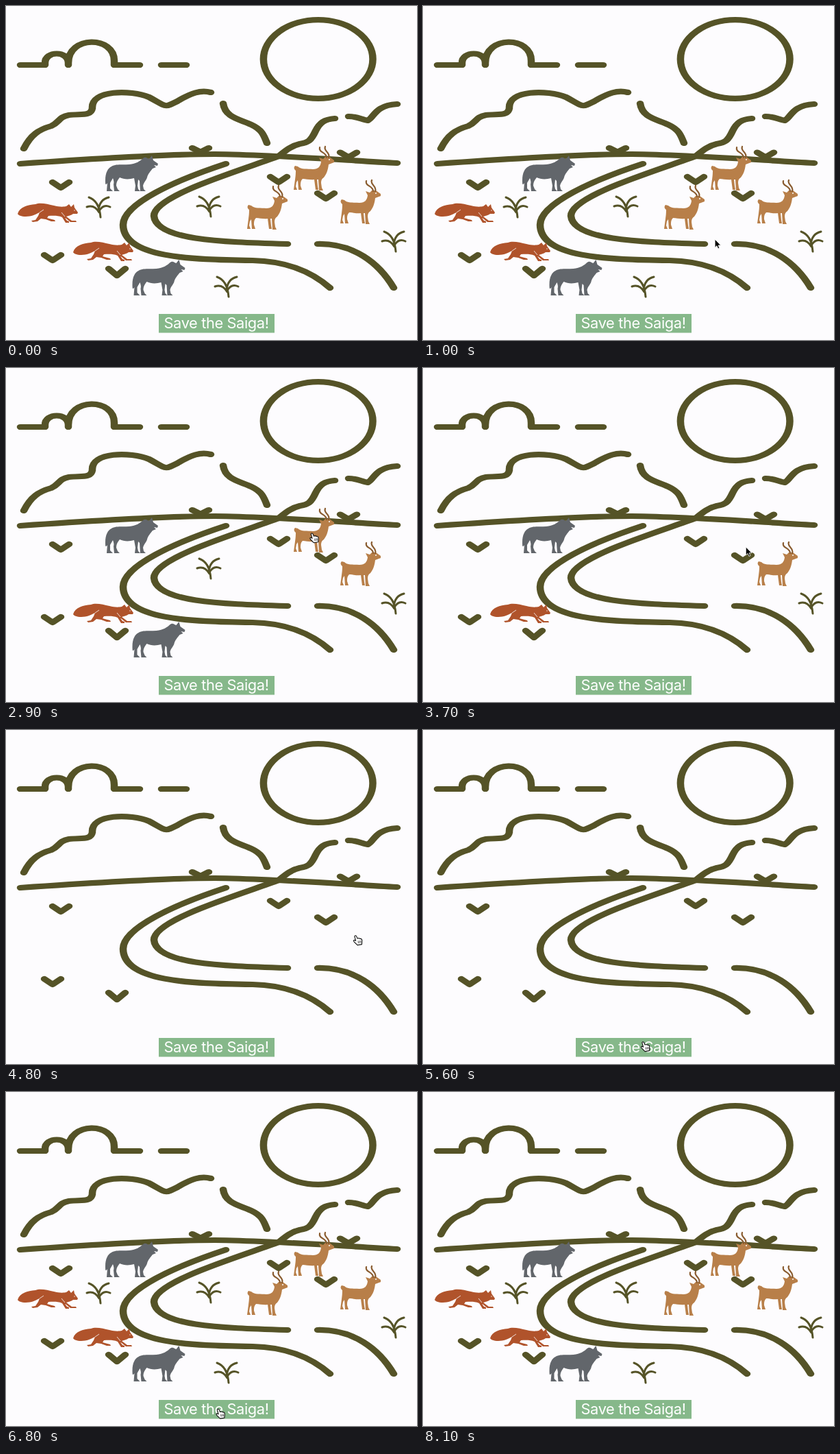
Recreate the animation shown at these times as an HTML page. Size 600 by 487 pixels, loop 8.3 s.

```html
<!DOCTYPE html>
<html lang="en">
<head>
<meta charset="utf-8">
<title>Save the Saiga!</title>
<style>
  html, body { margin: 0; width: 100%; height: 100%; overflow: hidden; background: #fdfcfe; }
  svg { display: block; width: 600px; height: 487px; }
  #land { fill: none; stroke: #555327; stroke-width: 8.2; stroke-linecap: round; stroke-linejoin: round; }
  #bush { fill: none; stroke: #555327; stroke-width: 3; stroke-linecap: round; }
  #wolf { fill: #62666b; }
  #fox { fill: #b0532b; }
  #saiga { fill: #b87f49; }
  text { font: 21.8px Inter, "Liberation Sans", sans-serif; letter-spacing: -.38px; fill: #fff; }
</style>
</head>
<body>
<svg viewBox="0 0 600 487">
  <defs>
    <path id="bush" d="M3,16C2,4-2,-9-14,-13M0,6C1,-4 6,-11 15,-13M-17,1Q-6,-3 1,9M1,7Q7,-4 17,1"/>
    <path id="wolf" d="M209,223L213,218L215,225L222,230L221,233L216,232L219,235L214,237C211,241 207,245 206,250
      C205,254 201,257 200,262L201,267L204,270H196L195,255L193,253L192,262L193,267L196,270H188L189,262L187,251
      C180,253 172,253 166,250C162,255 161,258 161,262L163,267L166,270H158L157,260C158,256 157,254 156,251
      L152,258V266L156,270H147L148,258C145,263 145,258 145,254C145,243 149,236 154,234
      C160,230 170,232 180,231C190,230 196,226 200,222C204,219 206,222 209,223Z"/>
    <g id="fox">
      <path d="M17,303C20,293 31,290 43,289C50,286 61,289 70,291C77,293 84,293 88,292L92,289L95,293L99,289L100,294
        L105,301L104,303L98,303C94,306 90,306 88,307L92,310L96,313L102,313L103,315H94L88,310L86,309
        L89,313L92,314V316H87L82,308C75,305 68,306 62,306L60,309C63,310 67,311 71,312L72,314H66L58,311
        L51,310L46,314L39,315L37,313L43,312L47,306L49,301C43,304 37,307 29,307C22,307 18,305 17,303Z"/>
      <path d="M49,301L55,297M86,307L81,301" fill="none" stroke="#fdfcfe" stroke-width=".8"/>
      <circle cx="100" cy="298" r=".7" fill="#fdfcfe"/>
    </g>
    <g id="saiga">
      <path d="M354,290L358,291C363,296 372,294 380,295C388,295 391,291 392,284L389,278L395,280L398,277L404,277
        L411,282V285L403,288C402,296 400,302 396,307C393,309 392,311 392,315L393,322L395,326H389L388,310H386
        L387,320L388,325H384L382,310C376,311 370,309 365,309C362,312 362,315 362,319L364,325H359L358,311
        L356,314L355,320L357,325H352L354,310C355,304 355,299 355,297C352,295 352,292 354,290Z"/>
      <path d="M400,278C400,270 388,271 390,263M403,278C406,270 395,269 398,262" fill="none"
        stroke="#8a5c30" stroke-width="2.2" stroke-linecap="round"/>
      <circle cx="404" cy="281" r="1" fill="#fdfcfe"/>
    </g>
  </defs>

  <g id="land" transform="scale(1.28 1)"></g>
  <g id="life"></g>
  <rect x="223" y="449" width="169" height="27.5" fill="#86b88a"/>
  <text x="230.5" y="470">Save the Saiga!</text>

  <g id="cursor" stroke-linejoin="round">
    <path id="arrow" d="M0,0V12L2.8,9.5L4.6,13.6L6.6,12.8L4.9,8.8H8.6Z" fill="#000" stroke="#fff" stroke-width=".8"/>
    <g id="hand" fill="#fff" stroke="#111" stroke-width="1.1">
      <path d="M1.8,1.8Q3,-.2 4.6,1.6L6,5Q8.4,3.8 9.2,5.2Q12.6,4.8 12.8,8L12.4,13.6L6,14.6L1.2,9.8Q-.4,7.4 1.8,7.2L3.6,8.2Z"/>
      <path d="M7,8.5L7.6,12M9,8.2L9.4,11.7M10.9,8L11,11.4" stroke-width=".7"/>
    </g>
  </g>
</svg>
<script>
const LOOP = 8300, STEP = 100, RESTORE = 6800, PEN = 1.28;
const $ = id => document.getElementById(id);

function add(parent, tag, attrs) {
  const el = document.createElementNS("http://www.w3.org/2000/svg", tag);
  for (const k in attrs) el.setAttribute(k, attrs[k]);
  return parent.appendChild(el);
}

// Landscape lines use a pen that is wider than it is tall.
const lines = [
  "M21,86L57,86L57,83C57,65 91,65 91,83L91,86L91,83C91,43 158,43 158,80L158,86L195,86",
  "M227,86L263,86",
  "M26,208C36,188 48,180 66,175C79,169 76,162 92,159C110,157 124,161 126,149C124,122 182,122 209,133C235,147 230,149 250,139C270,127 284,122 299,126",
  "M317,142C320,163 341,165 358,173C373,180 376,187 381,200",
  "M480,164C465,165 458,170 452,182C445,197 441,199 429,201C416,204 408,211 398,219C338,241 216,277 216,306C219,341 310,344 411,347",
  "M500,161C513,161 520,166 528,167C538,162 538,145 571,143",
  "M21,230C180,219 260,216 305,216C390,217 480,224 571,229",
  "M321,230C248,254 171,288 171,319C171,367 270,370 360,371C411,372 448,389 473,411",
  "M455,347C507,346 544,374 566,411"
];
const tufts = [[80, 261], [68, 367], [398, 253], [467, 277], [162, 388, 2], [284, 210, -2], [500, 217, -1]];
for (const [x, y, dip = 0] of tufts)
  lines.push(`M${x - 12},${y - 4 - dip / 2}L${x},${y + 4 + dip / 2}L${x + 12},${y - 4 - dip / 2}`);

for (const d of lines)
  add($("land"), "path", { d: d.replace(/([\d.]+),/g, (_, x) => (x / PEN).toFixed(2) + ",") });
add($("land"), "ellipse", { cx: 455.7 / PEN, cy: 77.5, rx: 79.8 / PEN, ry: 57.3 });

// Kind, offset, and the time of the click that removes it.
const life = [
  ["bush", 135, 292, 2100], ["fox", 0, 0, 2100], ["saiga", 0, 0, 2100], ["bush", 322, 408, 2100],
  ["bush", 296, 291, 3400], ["wolf", 39.5, 152, 3400], ["saiga", 68, -57, 3400],
  ["wolf", 0, 0, 4800], ["fox", 81, 56, 4800], ["saiga", 136, -8, 4800], ["bush", 566, 342, 4800]
].map(([kind, x, y, gone]) => ({ gone, el: add($("life"), "use", { href: "#" + kind, x, y }) }));

// Cursor stops: time, x, y.
const path = [
  [100, 546, 458], [900, 440, 350], [1800, 374, 303], [2300, 374, 303], [3100, 448, 236], [3500, 448, 236],
  [4400, 507, 299], [4800, 507, 299], [5600, 318, 454], [5800, 290, 456], [6200, 307, 461],
  [6300, 307, 461], [6500, 306.5, 461.5], [7200, 306.5, 461.5], [7500, 416, 270], [7900, 416, 270]
];
const overTarget = [[1700, 2400], [2900, 3600], [4100, 4900], [5500, 7300]];

function cursorAt(t) {
  const i = path.findIndex(p => p[0] > t);
  if (i < 1) return null;
  const [t0, x0, y0] = path[i - 1], [t1, x1, y1] = path[i];
  const rest = 1 - (t - t0) / (t1 - t0), k = 1 - rest * rest;
  return [x0 + (x1 - x0) * k, y0 + (y1 - y0) * k];
}

const show = (el, on) => el.style.display = on ? "" : "none";

function draw(t) {
  for (const { el, gone } of life) show(el, t < gone || t >= RESTORE);
  const at = cursorAt(t), isHand = overTarget.some(([a, b]) => t >= a && t < b);
  show($("cursor"), at);
  show($("hand"), isHand);
  show($("arrow"), !isHand);
  if (at) $("cursor").setAttribute("transform", `translate(${at})`);
}

const start = performance.now();
function tick() {
  const t = (performance.now() - start) % LOOP;
  draw(Math.floor(t / STEP) * STEP);
  requestAnimationFrame(tick);
}
tick();
</script>
</body>
</html>
```
